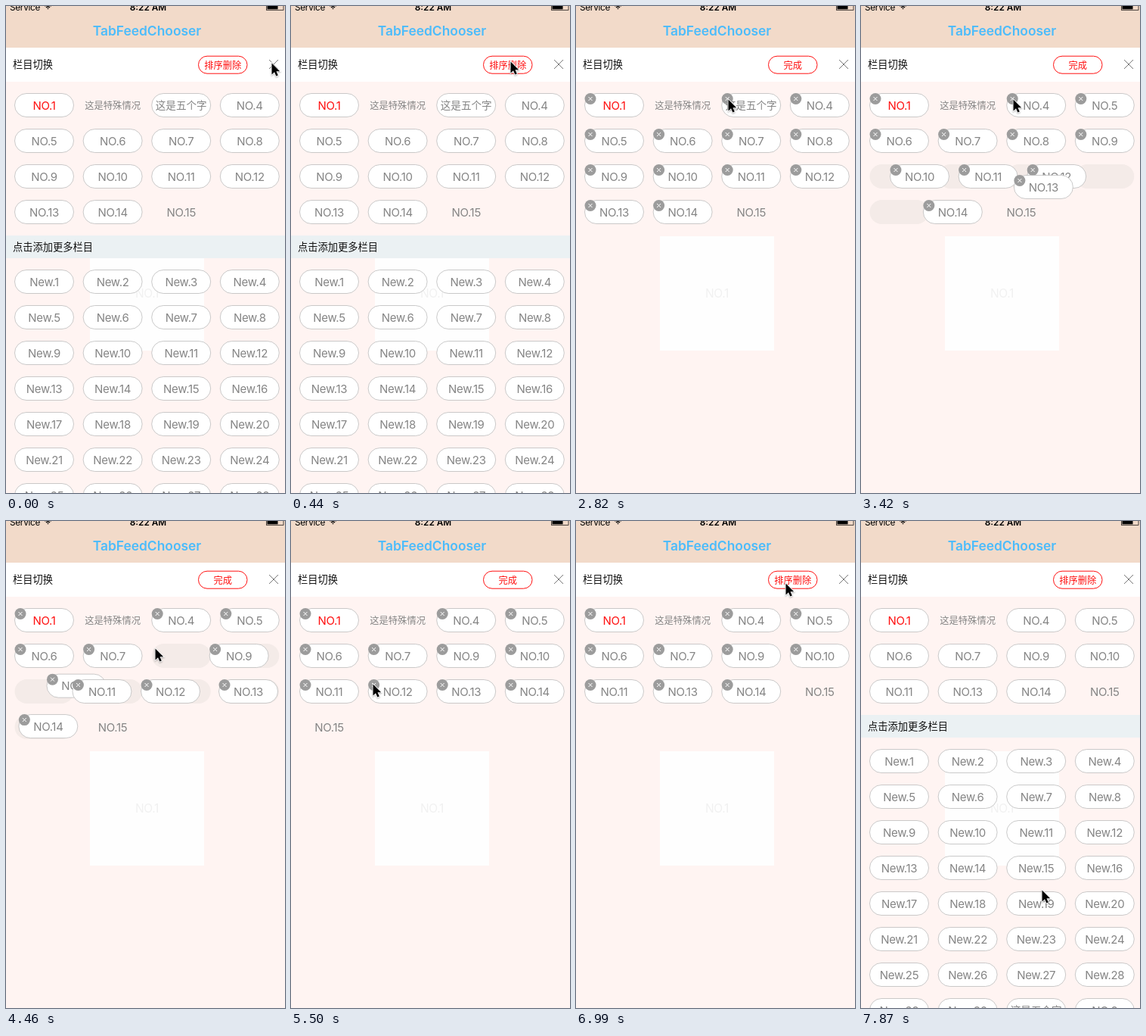
Write an HTML page with a canvas that moves like this. It is 369 px wide and 643 px high and loops after 8000 ms.

```html
<!DOCTYPE html>
<html lang="zh">
<head>
<meta charset="utf-8">
<style>
html, body { margin: 0; width: 100%; height: 100%; overflow: hidden; background: #fff4f2; }
canvas { display: block; width: 369px; height: 643px; }
</style>
</head>
<body>
<canvas id="stage"></canvas>
<script>
const W = 369, H = 643, LOOP = 8000, STEP = 148.5, SLIDE = 300;
const LATIN = 'Inter, sans-serif';
const HAN = '"Noto Sans CJK SC", "Noto Sans CJK", sans-serif';
const GRAY = '#858585', RED = '#ff1010';

const canvas = document.getElementById('stage');
const ratio = window.devicePixelRatio || 1;
canvas.width = W * ratio;
canvas.height = H * ratio;
const ctx = canvas.getContext('2d');

// Removed channels: step of the click, channel number, start time of each follower's slide
const removals = [
  { step: 21, item: 3, start: i => i < 10 ? 3095 : i < 14 ? 3224 : 3325 },
  { step: 29, item: 8, start: i => i < 13 ? 4380 : i < 15 ? 4430 : 4455 },
  { step: 39, item: 12, start: () => 5855 }
];

// Pointer: step, x, y
const pointer = [
  [0, 351, 75], [3, 290, 73], [14, 290, 73], [19, 201, 123], [24, 201, 123],
  [27, 197, 168], [31, 197, 168], [36, 104, 216], [37, 108, 215], [40, 108, 215],
  [46, 277, 82], [47, 277, 82], [51, 251, 443], [52, 251, 443], [53, 239, 487]
];

const lerp = (a, b, p) => a + (b - a) * p;
const ease = p => { p = Math.min(1, Math.max(0, p)); return p * p * (3 - 2 * p); };
const slotAt = (k, top = 115) => [11.5 + 90.6 * (k % 4), top + 47 * Math.floor(k / 4)];
const channelName = i => ({ 2: '这是特殊情况', 3: '这是五个字' })[i] || 'NO.' + i;
const hasPill = i => i !== 2 && i !== 15;

function rect(x, y, w, h, color) {
  ctx.fillStyle = color;
  ctx.fillRect(x, y, w, h);
}

function pill(x, y, w, h, fill, stroke, line = 0.7) {
  ctx.beginPath();
  ctx.roundRect(x, y, w, h, h / 2);
  ctx.fillStyle = fill;
  ctx.fill();
  if (!stroke) return;
  ctx.strokeStyle = stroke;
  ctx.lineWidth = line;
  ctx.stroke();
}

function lines(color, width, ...paths) {
  ctx.strokeStyle = color;
  ctx.lineWidth = width;
  ctx.beginPath();
  for (const [x1, y1, x2, y2] of paths) { ctx.moveTo(x1, y1); ctx.lineTo(x2, y2); }
  ctx.stroke();
}

// y is the vertical middle of the letters
function text(str, x, y, size, color, align = 'center', weight = 400) {
  const latin = str.charCodeAt(0) < 256;
  ctx.font = `${weight} ${size}px ${latin ? LATIN : HAN}`;
  ctx.letterSpacing = latin && weight === 400 ? '-0.3px' : '0px';
  ctx.textAlign = align;
  ctx.fillStyle = color;
  ctx.fillText(str, x, y + size * 0.37);
}

function badge(x, y, alpha) {
  ctx.globalAlpha = alpha;
  ctx.beginPath();
  ctx.arc(x, y, 7.5, 0, 7);
  ctx.fillStyle = '#9c9c9c';
  ctx.fill();
  lines('#fff', 1, [x - 2.5, y - 2.5, x + 2.5, y + 2.5], [x + 2.5, y - 2.5, x - 2.5, y + 2.5]);
  ctx.globalAlpha = 1;
}

function cell(name, x, y, { framed = true, color = GRAY, badgeAlpha = 0 } = {}) {
  if (framed) pill(x, y + 0.5, 78, 31, '#fff', '#b4b4b4');
  const size = name.length === 6 && name[0] === '这' ? 12.3 : name[0] === '这' ? 13.6 : 15;
  text(name, x + 39, y + 16, size, color);
  if (framed && badgeAlpha) badge(x + 7.5, y + 7.5, badgeAlpha);
}

function statusBar() {
  rect(0, 0, W, 55, '#f2dac9');
  text('Service', 5, 1.2, 11.8, '#000', 'left');
  text('8:22 AM', 188, 1.2, 11.8, '#000', 'center', 600);
  ctx.strokeStyle = '#000';
  ctx.lineWidth = 1.5;
  for (const r of [1, 3.5, 6]) {
    ctx.beginPath();
    ctx.arc(55.5, 4.5, r, -Math.PI * 0.75, -Math.PI * 0.25);
    ctx.stroke();
  }
  ctx.lineWidth = 0.7;
  ctx.strokeRect(344.5, -5, 22.5, 10.3);
  rect(345.5, -4, 14, 8.3, '#000');
  text('TabFeedChooser', 186.5, 33, 17.4, '#4cbcfb', 'center', 600);
}

function toolbar(step) {
  rect(0, 55, W, 45, '#fff');
  text('栏目切换', 9, 77.5, 13.25, '#111', 'left');
  pill(254.5, 66.2, 64.5, 23, '#fff', RED, 1);
  text(step >= 12 && step < 47 ? '完成' : '排序删除', 286.7, 78, 12.25, RED);
  lines('#777', 1, [348, 71, 360, 83], [360, 71, 348, 83]);
}

function channels(step, time) {
  const gone = removals.filter(r => step >= r.step);
  const badgeAlpha = step < 12 || step >= 48 ? 0 : step === 12 ? 0.17 : 1;
  const shown = [];
  for (let i = 1; i <= 15; i++) {
    if (gone.some(r => r.item === i)) continue;
    let slot = i - 1, move = null;
    for (const r of gone) {
      if (r.item > i) continue;
      const p = ease((time - r.start(i)) / SLIDE);
      if (p < 1) move = p; else slot--;
    }
    shown.push({ i, slot, move });
  }
  for (const { i, slot, move } of shown) {
    if (move === null || (i === 15 && move > 0)) continue;
    const [x, y] = slotAt(slot - 1);
    pill(x, y, 78, 32, '#f4ebe8');
  }
  for (const { i, slot, move } of shown) {
    const [x1, y1] = slotAt(slot);
    const [x2, y2] = move === null ? [x1, y1] : slotAt(slot - 1);
    cell(channelName(i), lerp(x1, x2, move), lerp(y1, y2, move),
      { framed: hasPill(i), color: i === 1 ? RED : GRAY, badgeAlpha });
  }
}

function moreChannels(step) {
  if (step >= 12 && step < 48) return;
  const top = 115 + 47 * (step < 12 ? 4 : 3);
  rect(0, top, W, 30, '#ebf1f3');
  text('点击添加更多栏目', 9, top + 15, 13.25, '#111', 'left');
  const names = Array.from({ length: 30 }, (_, k) => 'New.' + (k + 1));
  for (const r of removals) if (step >= r.step) names.push(channelName(r.item));
  names.forEach((name, k) => cell(name, ...slotAt(k, top + 45)));
}

function cursor(step) {
  const next = pointer.findIndex(key => key[0] > step);
  const a = pointer[next < 0 ? pointer.length - 1 : next - 1];
  const b = next < 0 ? a : pointer[next];
  const p = a === b ? 0 : ease((step - a[0]) / (b[0] - a[0]));
  ctx.save();
  ctx.translate(lerp(a[1], b[1], p), lerp(a[2], b[2], p));
  const arrow = new Path2D('M.5.5V15.5L4 12.3 6.3 17.6 8.8 16.5 6.5 11.3H11.2Z');
  ctx.shadowColor = 'rgba(0,0,0,.3)';
  ctx.shadowBlur = 2 * ratio;
  ctx.shadowOffsetY = ratio;
  ctx.strokeStyle = '#fff';
  ctx.lineWidth = 1.6;
  ctx.stroke(arrow);
  ctx.shadowColor = 'transparent';
  ctx.fillStyle = '#000';
  ctx.fill(arrow);
  ctx.restore();
}

function draw(now) {
  const step = Math.floor((now % LOOP + 6) / STEP);
  ctx.setTransform(ratio, 0, 0, ratio, 0, 0);
  rect(0, 0, W, H, '#fff4f2');
  rect(111, 304, 151, 151, '#fefefe');
  text('NO.1', 186.5, 379.5, 15.5, '#f1f1f1');
  statusBar();
  toolbar(step);
  channels(step, step * STEP);
  moreChannels(step);
  cursor(step);
}

const begin = performance.now();
function tick() {
  draw(performance.now() - begin);
  requestAnimationFrame(tick);
}
tick();
</script>
</body>
</html>
```
